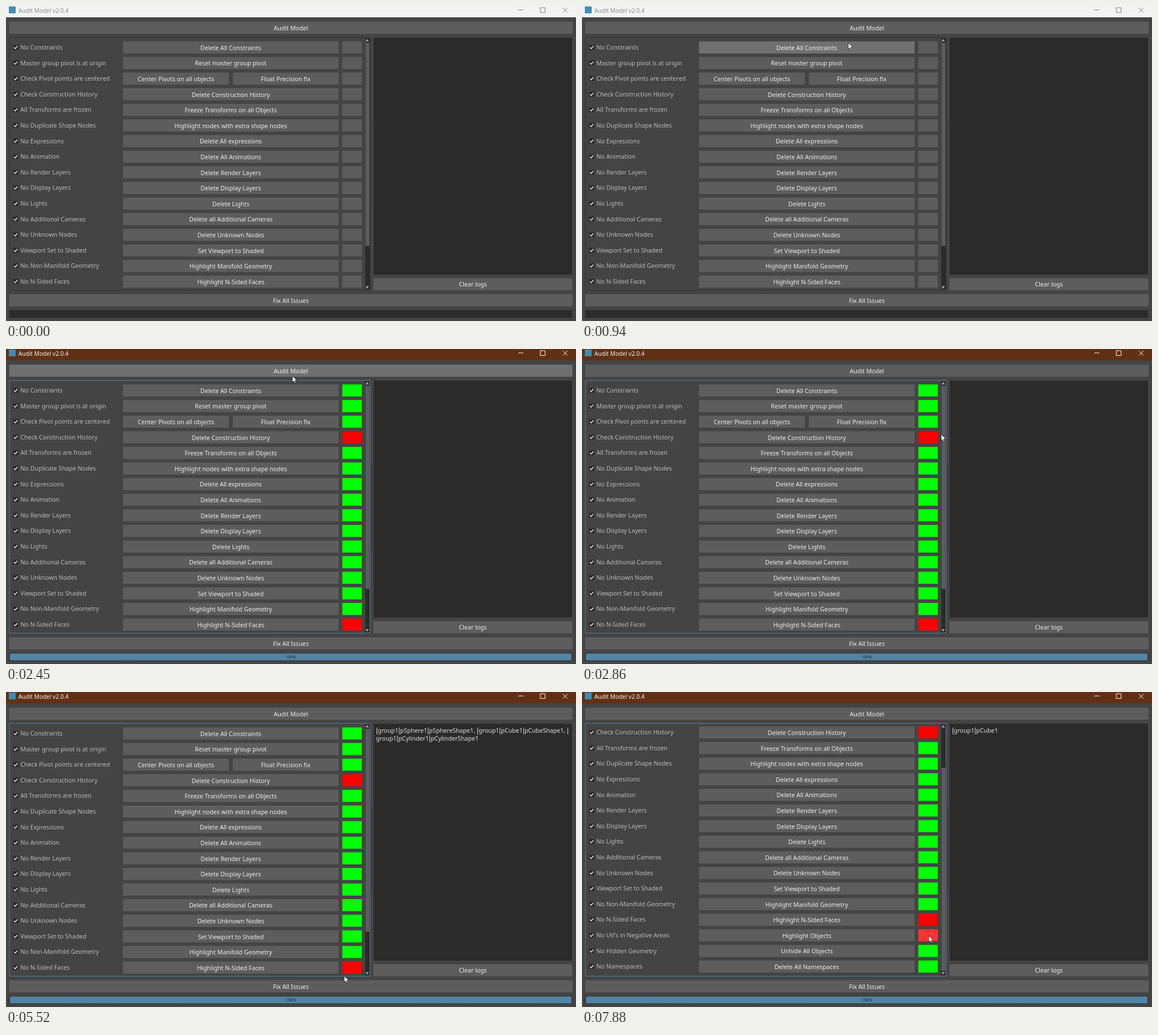
An HTML page with a canvas for the animation above (8 s loop, 1006 by 557 pixels).

```html
<!DOCTYPE html>
<html lang="en">
<head>
<meta charset="utf-8">
<title>Audit Model</title>
<style>
  html, body { margin: 0; width: 100%; height: 100%; overflow: hidden; background: #444; }
  canvas { display: block; width: 1006px; height: 557px; }
</style>
</head>
<body>
<canvas id="stage" width="1006" height="557"></canvas>
<script>
const ctx = document.getElementById('stage').getContext('2d');
const LOOP = 8000;
const FONT = '10.65px "Noto Sans", "Open Sans", sans-serif';
const TITLE_FONT = '10.2px "Open Sans", "Noto Sans", sans-serif';
const TINY_FONT = '7.2px "Noto Sans", sans-serif';
const PIPE_FONT = '12px "Liberation Sans", Arial, sans-serif';
const GREY = '#5d5d5d', RED = '#f00', GREEN = '#0f0', DARK = '#2b2b2b';
const HOVER = { [GREY]: '#707070', [RED]: '#f33', [GREEN]: '#3f3' };
const ROW_TOP = 62.6, ROW_STEP = 27.6, ROW_H = 21.4;
const MAX_SCROLL = 84.6, NOTCHES = [6340, 6410], HOVER_REFRESH = 6940;
const CLICKS = [1850, 3390, 7750], CLICK_MS = 130;
const [checkedAt, shapesLoggedAt, cubeLoggedAt] = CLICKS.map(t => t + CLICK_MS);

// Each row: label, then one or two button captions.
const rows = `No Constraints/Delete All Constraints
Master group pivot is at origin/Reset master group pivot
Check Pivot points are centered/Center Pivots on all objects/Float Precision fix
Check Construction History/Delete Construction History
All Transforms are frozen/Freeze Transforms on all Objects
No Duplicate Shape Nodes/Highlight nodes with extra shape nodes
No Expressions/Delete All expressions
No Animation/Delete All Animations
No Render Layers/Delete Render Layers
No Display Layers/Delete Display Layers
No Lights/Delete Lights
No Additional Cameras/Delete all Additional Cameras
No Unknown Nodes/Delete Unknown Nodes
Viewport Set to Shaded/Set Viewport to Shaded
No Non-Manifold Geometry/Highlight Manifold Geometry
No N-Sided Faces/Highlight N-Sided Faces
No UV's in Negative Areas/Highlight Objects
No Hidden Geometry/Unhide All Objects
No Namespaces/Delete All Namespaces`.split('\n').map(row => row.split('/'));
const failed = /History|N-Sided|UV's/;

const move = (start, end, x, y) => ({ start, end, x, y });
const origin = { x: 872, y: 512 };
const moves = [
  move(520, 940, 470, 65),
  move(940, 1430, 501, 44),
  move(2400, 2860, 634, 151),
  move(2860, 3190, 612, 154),
  move(4150, 4550, 690, 70),
  move(4550, 4960, 810, 85),
  move(4970, 5520, 597, 502),
  move(5520, 5860, 604, 493),
  move(6080, 6270, 546, 425),
  move(6870, 7290, 612, 431),
];

let pointer, pressed;

const ease = k => k * k * (3 - 2 * k);

function pointerAt(t) {
  if (t < moves[0].start) return null;
  let { x, y } = origin;
  for (const m of moves) {
    const k = ease(Math.min(1, Math.max(0, (t - m.start) / (m.end - m.start))));
    x += (m.x - x) * k;
    y += (m.y - y) * k;
  }
  return { x, y };
}

function rect(x, y, w, h, color) {
  ctx.fillStyle = color;
  ctx.fillRect(x, y, w, h);
}

function text(str, x, y, color, align = 'left', font = FONT) {
  ctx.font = font;
  ctx.textAlign = align;
  ctx.fillStyle = color;
  ctx.fillText(str, x, y);
}

function stroke(shape, color, width = 1) {
  ctx.strokeStyle = color;
  ctx.lineWidth = width;
  ctx.stroke(new Path2D(shape));
}

function arrow(y, dir) {
  ctx.fillStyle = '#aaa';
  ctx.fill(new Path2D(`M637.5 ${y - 2 * dir}l3 ${4 * dir}h-6z`));
}

function button(x, y, w, h, label, color = GREY, hitY = y, enabled = true) {
  const over = enabled && pointer && pointer.x >= x && pointer.x < x + w &&
    pointer.y >= hitY && pointer.y < hitY + h;
  rect(x, y, w, h, !over ? color : pressed ? '#1d1d1d' : HOVER[color]);
  if (label) text(label, x + w / 2, Math.round(y + h / 2 + 4.4), '#eee', 'center');
}

function titleBar(active) {
  const ink = active ? '#fff' : '#777';
  rect(0, 0, 1006, 20, active ? '#613014' : '#f3f3f3');
  rect(5, 1, 12, 12, '#3c8db5');
  text('Audit Model v2.0.4', 22, 11.5, active ? '#fff' : '#858585', 'left', TITLE_FONT);
  stroke('M904 7h9M943 3h8.5v8.5h-8.5zM983 3.5l8 8m0-8l-8 8', ink);
}

function checkbox(x, y) {
  rect(x, y, 9, 9, DARK);
  stroke(`M${x + 1.7} ${y + 4.6}l2 2.2l3.9-4.6`, '#eee', 1.4);
}

function listRow([label, ...captions], y, hitY, checked, inside) {
  const gap = 7, left = 206.5, span = 380.5;
  const w = (span - gap * (captions.length - 1)) / captions.length;
  const status = !checked ? GREY : failed.test(label) ? RED : GREEN;
  checkbox(12.5, y + 6);
  text(label, 25.5, Math.round(y + 14.4), '#bbb');
  captions.forEach((caption, i) =>
    button(left + i * (w + gap), y, w, ROW_H, caption, GREY, hitY, inside));
  button(593.5, y, 34.5, ROW_H, '', status, hitY, inside);
}

function list(scroll, hitScroll, checked, active) {
  const inside = !!pointer && pointer.y > 57 && pointer.y < 501;
  ctx.save();
  ctx.beginPath();
  ctx.rect(7, 57, 635, 444);
  ctx.clip();
  rows.forEach((row, i) => {
    const top = ROW_TOP + i * ROW_STEP;
    listRow(row, top - scroll, top - hitScroll, checked, inside);
  });
  rect(634, 57, 8, 444, DARK);
  rect(634.5, 65 + 69 * scroll / MAX_SCROLL, 7, 359, GREY);
  arrow(60.5, 1);
  arrow(497.5, -1);
  ctx.restore();
  stroke('M6 55.5h636.5v447h-636.5z', active ? '#4d7f9e' : '#303030');
}

function logPanel(t) {
  rect(649, 56, 350, 419, DARK);
  let log = '';
  if (t >= cubeLoggedAt) log = '|group1|pCube1';
  else if (t >= shapesLoggedAt) {
    log = '|group1|pSphere1|pSphereShape1, |group1|pCube1|pCubeShape1, |\n' +
      'group1|pCylinder1|pCylinderShape1';
  }
  log.split('\n').forEach((row, i) => {
    let x = 653;
    for (const part of row.split(/(\|)/)) {
      text(part, x, 71.5 + i * 14, '#ddd', 'left', part === '|' ? PIPE_FONT : FONT);
      x += ctx.measureText(part).width;
    }
  });
}

function progress(done) {
  rect(5.5, 537.5, 994, 14, '#333');
  rect(7, 538.5, 991, 12, done ? '#5285a6' : DARK);
  if (!done) return;
  for (let x = 13; x < 998; x += 7) rect(x, 538.5, 1, 12, '#4d7f9f');
  text('100%', 502.5, 547, '#222', 'center', TINY_FONT);
}

function drawPointer() {
  ctx.save();
  ctx.translate(pointer.x, pointer.y);
  if (pressed) {
    ctx.fillStyle = 'rgba(230, 210, 0, 0.7)';
    ctx.beginPath();
    ctx.arc(0, -1, 10, 0, Math.PI * 2);
    ctx.fill();
  }
  const shape = 'M0 0v11l2.5-2.2l1.7 3.8l1.8-.8l-1.6-3.7h3.4z';
  ctx.fillStyle = '#fff';
  ctx.fill(new Path2D(shape));
  stroke(shape, '#111', 0.7);
  ctx.restore();
}

function draw(t) {
  const active = t >= CLICKS[0], checked = t >= checkedAt;
  const turned = NOTCHES.filter(at => t >= at).length;
  const scroll = MAX_SCROLL * turned / NOTCHES.length;
  const hitScroll = t < HOVER_REFRESH ? 0 : scroll; // hover waits for the pointer to move
  pointer = pointerAt(t);
  pressed = CLICKS.some(down => t >= down && t < down + CLICK_MS);

  rect(0, 0, 1006, 557, '#444');
  titleBar(active);
  button(5.5, 27.7, 994.5, ROW_H, 'Audit Model');
  list(scroll, hitScroll, checked, active);
  rect(644.5, 204, 1.5, 150, '#383838');
  logPanel(t);
  button(648.5, 481.2, 351, ROW_H, 'Clear logs');
  button(5.5, 509.7, 994.5, ROW_H, 'Fix All Issues');
  progress(checked);
  if (pointer) drawPointer();
}

function tick() {
  draw(performance.now() % LOOP);
  requestAnimationFrame(tick);
}
tick();
</script>
</body>
</html>
```
